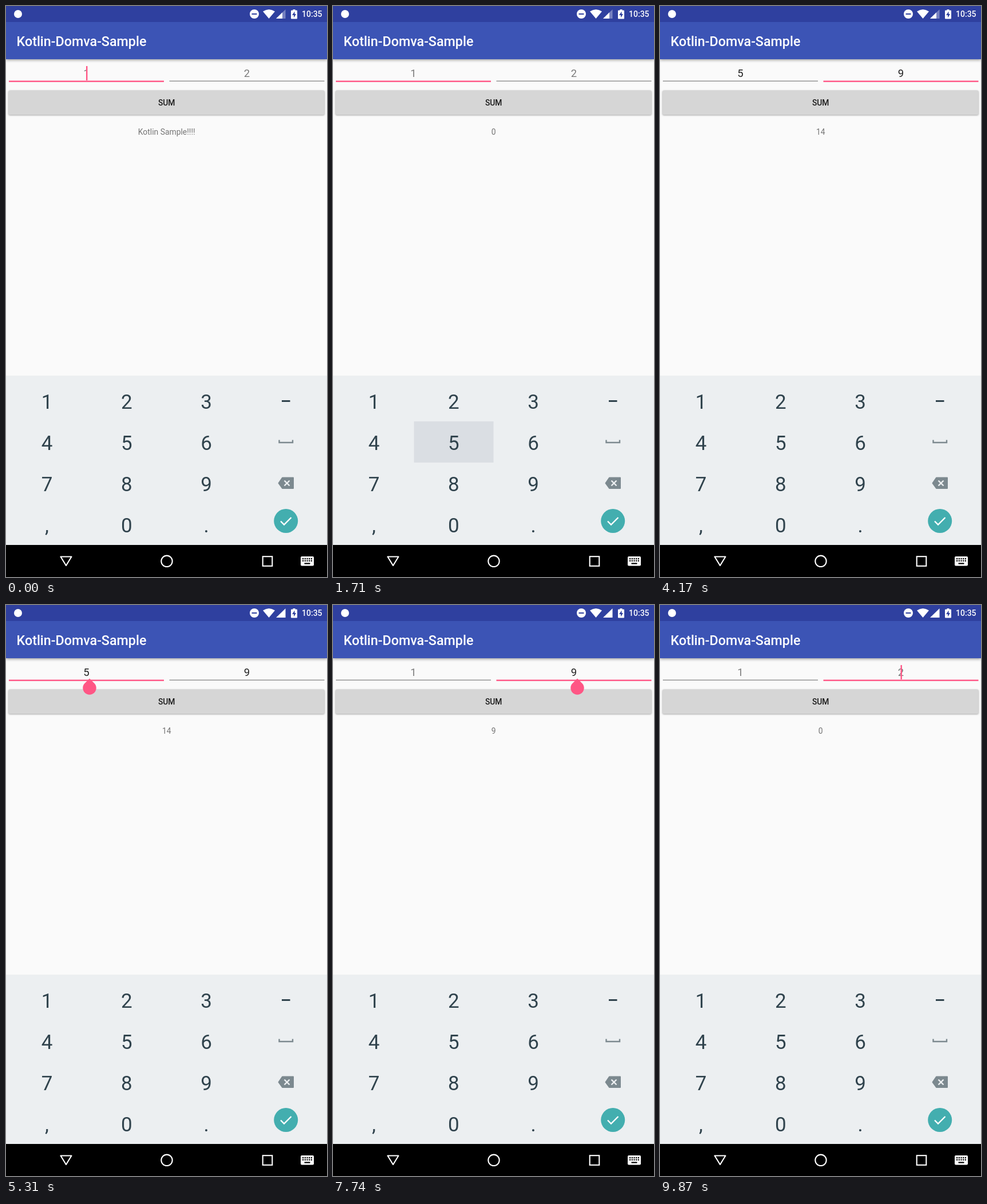
These frames come from a looping animation (561x998 px, 9900 ms). An HTML page with a canvas:

```html
<!DOCTYPE html>
<html lang="en">
<head>
<meta charset="utf-8">
<style>
html, body { margin: 0; width: 100%; height: 100%; overflow: hidden; background: #fafafa; }
canvas { display: block; width: 561px; height: 998px; }
</style>
</head>
<body>
<canvas id="stage" width="561" height="998"></canvas>
<script>
const ctx = document.getElementById('stage').getContext('2d');
const LOOP = 9900;
const PINK = '#ff5685';
const KEY_INK = '#30434d';

// Each track lists [start time, value]; the last started entry holds.
const result = [[0, 'Kotlin Sample!!!!'], [990, '0'], [2010, '5'], [3780, '14'], [6330, '9'], [8200, '0']];
const first = [[0, ''], [1770, '5'], [5610, '']];
const second = [[0, ''], [3510, '9'], [7860, '']];
const focus = [[0, 0], [2700, 1], [4700, 0], [6000, 1]];
const blinkStart = [[0, -90], [1770, 1770], [2700, 2700], [3510, 3510], [4700, 4700],
  [5610, 5610], [6000, 6000], [7860, 7860]];

const sumTaps = [[950, 440], [1970, 440], [3740, 467], [6290, 440], [8160, 400]];
const keyTaps = [[1650, 1, 1], [3400, 2, 2], [5500, 3, 2], [7750, 3, 2]];
const KEY_HOLD = 120;
// Insertion handles: shown from, fading from, fade length, x.
const handles = [[4700, 5610, 250, 146], [6000, 7860, 270, 427]];

const at = (track, t) => track.filter(([start]) => start <= t).pop()[1];

function rect(x, y, w, h, color) {
  ctx.fillStyle = color;
  ctx.fillRect(x, y, w, h);
}

function text(str, x, y, size, color, weight = 400, align = 'center') {
  ctx.font = `${weight} ${size}px Roboto, sans-serif`;
  ctx.textAlign = align;
  ctx.fillStyle = color;
  ctx.fillText(str, x, y);
}

function trace(points, close) {
  ctx.beginPath();
  points.forEach(([x, y]) => ctx.lineTo(x, y));
  if (close) ctx.closePath();
}

function polygon(points, color) {
  trace(points, true);
  ctx.fillStyle = color;
  ctx.fill();
}

function polyline(points, color, width, close = false) {
  trace(points, close);
  ctx.strokeStyle = color;
  ctx.lineWidth = width;
  ctx.stroke();
}

function disc(x, y, r, color) {
  ctx.beginPath();
  ctx.arc(x, y, r, 0, Math.PI * 2);
  ctx.fillStyle = color;
  ctx.fill();
}

function roundRect(x, y, w, h, r, color) {
  ctx.beginPath();
  ctx.roundRect(x, y, w, h, r);
  ctx.fillStyle = color;
  ctx.fill();
}

function shadowed(blur, dy, alpha, draw) {
  ctx.save();
  ctx.shadowColor = `rgba(0,0,0,${alpha})`;
  ctx.shadowBlur = blur;
  ctx.shadowOffsetY = dy;
  draw();
  ctx.restore();
}

function statusBar(t) {
  rect(0, 0, 561, 28, '#2f409f');
  disc(21, 14, 7, '#fff');
  disc(434, 14, 8, '#fff');
  rect(429.5, 13, 9, 2, '#2f409f');

  ctx.beginPath();
  ctx.moveTo(459.5, 22);
  ctx.lineTo(449, 9.5);
  ctx.quadraticCurveTo(459.5, 2.5, 470, 9.5);
  ctx.closePath();
  ctx.fillStyle = '#fff';
  ctx.fill();

  const fullSignal = t >= 5220;
  polygon([[472, 22], [488.5, 22], [488.5, 6]], fullSignal ? '#fff' : 'rgba(255,255,255,.35)');
  if (!fullSignal) polygon([[472, 22], [483, 22], [483, 11.3]], '#fff');

  rect(501.5, 6, 4, 2, '#fff');
  roundRect(498, 7.5, 11, 15, 1, '#fff');
  polygon([[504.5, 9.5], [500, 16], [503, 16], [503, 20.5], [507, 14], [504.5, 14]], '#2f409f');
  text('10:35', 517, 19, 14, '#fff', 500, 'left');
}

function toolbar() {
  shadowed(5, 1.5, .4, () => rect(0, 28, 561, 65, '#3c54b5'));
  text('Kotlin-Domva-Sample', 18.5, 70, 23.3, '#fff', 500, 'left');
}

function field(x, width, value, hint, focused) {
  const center = x + width / 2;
  text(value || hint, center, 124, 18.5, value ? '#212121' : '#7b7b7b');
  if (focused) rect(x, 130.5, width, 2.4, PINK);
  else rect(x, 130.6, width, 1.2, '#7d7d7d');
}

function fields(t) {
  const active = at(focus, t);
  const values = [at(first, t), at(second, t)];
  field(5, 271, values[0], '1', active === 0);
  field(285.5, 271, values[1], '2', active === 1);
  if ((t - at(blinkStart, t)) % 1000 < 500) {
    const x = [141.2, 421.7][active] + (values[active] ? 5.2 : 0);
    rect(x - 1.2, 105, 2.4, 25, PINK);
  }
}

function sumButton(t) {
  const tap = sumTaps.find(([start]) => t >= start && t < start + 350);
  const raised = tap ? 1 : 0;
  shadowed(3 + 2 * raised, 1 + raised, .35, () =>
    roundRect(4.5, 147.5, 552, 42.5, 2, raised ? '#d4d4d4' : '#d6d6d6'));
  if (tap) {
    const p = (t - tap[0]) / 350;
    ctx.save();
    ctx.beginPath();
    ctx.roundRect(4.5, 147.5, 552, 42.5, 2);
    ctx.clip();
    disc(tap[1], 191, 7 + 24 * p, `rgba(0,0,0,${.075 * Math.min(1, 2 * (1 - p))})`);
    ctx.restore();
  }
  text('SUM', 280.7, 174, 13.9, '#1b1b1b', 500);
}

function handle(x, alpha) {
  const y = 145, r = 11.7;
  ctx.globalAlpha = alpha;
  ctx.beginPath();
  ctx.moveTo(x, y - r * Math.SQRT2);
  ctx.arc(x, y, r, -Math.PI / 4, Math.PI * 5 / 4);
  ctx.closePath();
  ctx.fillStyle = PINK;
  ctx.fill();
  ctx.globalAlpha = 1;
}

function handleLayer(t) {
  for (const [start, end, fade, x] of handles) {
    if (t >= start && t < end + fade) handle(x, t < end ? 1 : 1 - (t - end) / fade);
  }
}

function keyboard(t) {
  rect(0, 646, 561, 296, '#eceff1');
  for (const [start, col, row] of keyTaps) {
    if (t >= start && t < start + KEY_HOLD) {
      rect(2.5 + 139 * col, 726 + 72 * (row - 1), 139, 72, '#dadee3');
    }
  }
  ['123', '456', '789', ',0.'].forEach((keys, row) =>
    [...keys].forEach((key, col) =>
      text(key, 71.5 + 139.3 * col, 703.5 + 72 * row, 35, KEY_INK)));

  rect(482, 689, 14.5, 3, KEY_INK);
  polyline([[477.5, 758.5], [477.5, 763], [501, 763], [501, 758.5]], '#7c898f', 2.4);
  ctx.lineJoin = 'round';
  const shape = [[476.5, 834], [483, 824.5], [502, 824.5], [502, 843], [483, 843]];
  polygon(shape, '#7c898f');
  polyline(shape, '#7c898f', 2, true);
  ctx.lineJoin = 'miter';
  polyline([[486.5, 829.5], [495.5, 838.5]], '#eceff1', 2.4);
  polyline([[495.5, 829.5], [486.5, 838.5]], '#eceff1', 2.4);

  disc(489.2, 900, 21, '#43aeaf');
  polyline([[480, 900.5], [486, 906.5], [498.5, 894]], '#fff', 2.4);
}

function navBar() {
  rect(0, 942, 561, 56, '#000');
  ctx.lineJoin = 'round';
  polyline([[95.5, 962.5], [114.5, 962.5], [105, 978]], '#fff', 2.1, true);
  ctx.lineJoin = 'miter';
  ctx.beginPath();
  ctx.arc(281, 970.3, 9.7, 0, Math.PI * 2);
  ctx.stroke();
  ctx.strokeRect(448.7, 962.2, 16.6, 16.6);

  roundRect(515, 962, 23, 16.5, 2, '#fff');
  for (let row = 0; row < 2; row++) {
    for (let col = 0; col < 5; col++) rect(518 + 3.7 * col, 965 + 3.6 * row, 2.2, 2.2, '#000');
  }
  rect(521.5, 973.3, 10, 2.2, '#000');
}

function draw(now) {
  const t = now % LOOP;
  rect(0, 0, 561, 998, '#fafafa');
  toolbar();
  statusBar(t);
  sumButton(t);
  fields(t);
  text(at(result, t), 280.7, 225, 13.9, '#757575');
  handleLayer(t);
  keyboard(t);
  navBar();
}

let origin;
function tick(now) {
  origin ??= now;
  draw(Math.max(0, now - origin));
  requestAnimationFrame(tick);
}
draw(0);
requestAnimationFrame(tick);
</script>
</body>
</html>
```
